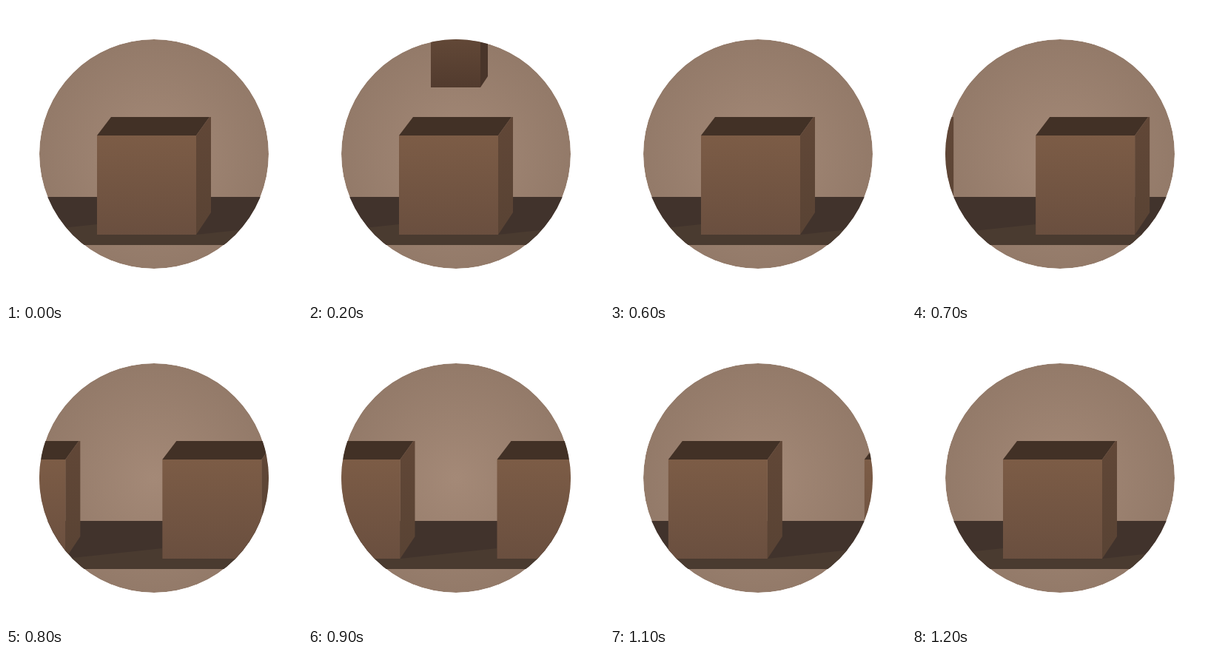
These frames come from a looping animation (400 px wide and 400 px high, 1.3 s). An HTML page:

```html
<!DOCTYPE html>
<html lang="en">
<head>
<meta charset="utf-8">
<title>Box loop</title>
<style>
  html, body { margin: 0; width: 100%; height: 100%; overflow: hidden; background: #fff; }
  svg { display: block; width: 100vw; height: 100vh; }
</style>
</head>
<body>
<svg viewBox="0 0 400 400">
  <defs>
    <clipPath id="disc"><circle cx="200" cy="200" r="155"/></clipPath>
    <radialGradient id="wall">
      <stop stop-color="#a48977"/><stop offset="1" stop-color="#937a69"/>
    </radialGradient>
    <linearGradient id="front" x2="0" y2="1">
      <stop stop-color="#7c5c46"/><stop offset="1" stop-color="#6a4f3f"/>
    </linearGradient>
    <linearGradient id="side" x2="0" y2="1">
      <stop stop-color="#614737"/><stop offset="1" stop-color="#594334"/>
    </linearGradient>
    <linearGradient id="smallFront" x2="0" y2="1">
      <stop stop-color="#624837"/><stop offset="1" stop-color="#523b2e"/>
    </linearGradient>
    <g id="back">
      <path d="M257 309L388 295V309Z" fill="#4a3b30"/>
      <path d="M123 175L142 150H275L257 175Z" fill="#423126"/>
    </g>
    <g id="box">
      <path d="M257 175L275 150H277V279L257 309Z" fill="url(#side)"/>
      <path d="M123 175H257V309H123Z" fill="url(#front)"/>
    </g>
  </defs>
  <g clip-path="url(#disc)">
    <circle cx="200" cy="200" r="155" fill="url(#wall)"/>
    <path d="M0 258H400V323H0Z" fill="#41332c"/>
    <path d="M0 309H400V323H0Z" fill="#4a3b30"/>
    <g class="row"><use href="#back" x="-265"/><use href="#back"/></g>
    <!-- small box, its front bottom edge at y = 0 -->
    <g id="small">
      <path d="M166 -67L175.5 -79H243L233 -67Z" fill="#513b2e"/>
      <path d="M233 -67L243 -79V-15L233 0Z" fill="#49352a"/>
      <path d="M166 -67H233V0H166Z" fill="url(#smallFront)"/>
    </g>
    <g class="row"><use href="#box" x="-265"/><use href="#box"/></g>
  </g>
</svg>
<script>
  const STEP = 100, LOOP = 13, HALF = 6, SPACING = 265;
  const small = document.getElementById('small');
  const rows = document.querySelectorAll('.row');

  function draw() {
    const step = Math.floor(performance.now() / STEP) % LOOP;
    const drop = 37 + 36.5 * step;
    const slide = SPACING * Math.max(0, step - HALF) / HALF % SPACING;
    small.setAttribute('transform', `translate(0 ${drop})`);
    small.style.display = step < HALF ? '' : 'none';
    for (const row of rows) row.setAttribute('transform', `translate(${slide} 0)`);
    requestAnimationFrame(draw);
  }
  draw();
</script>
</body>
</html>
```
